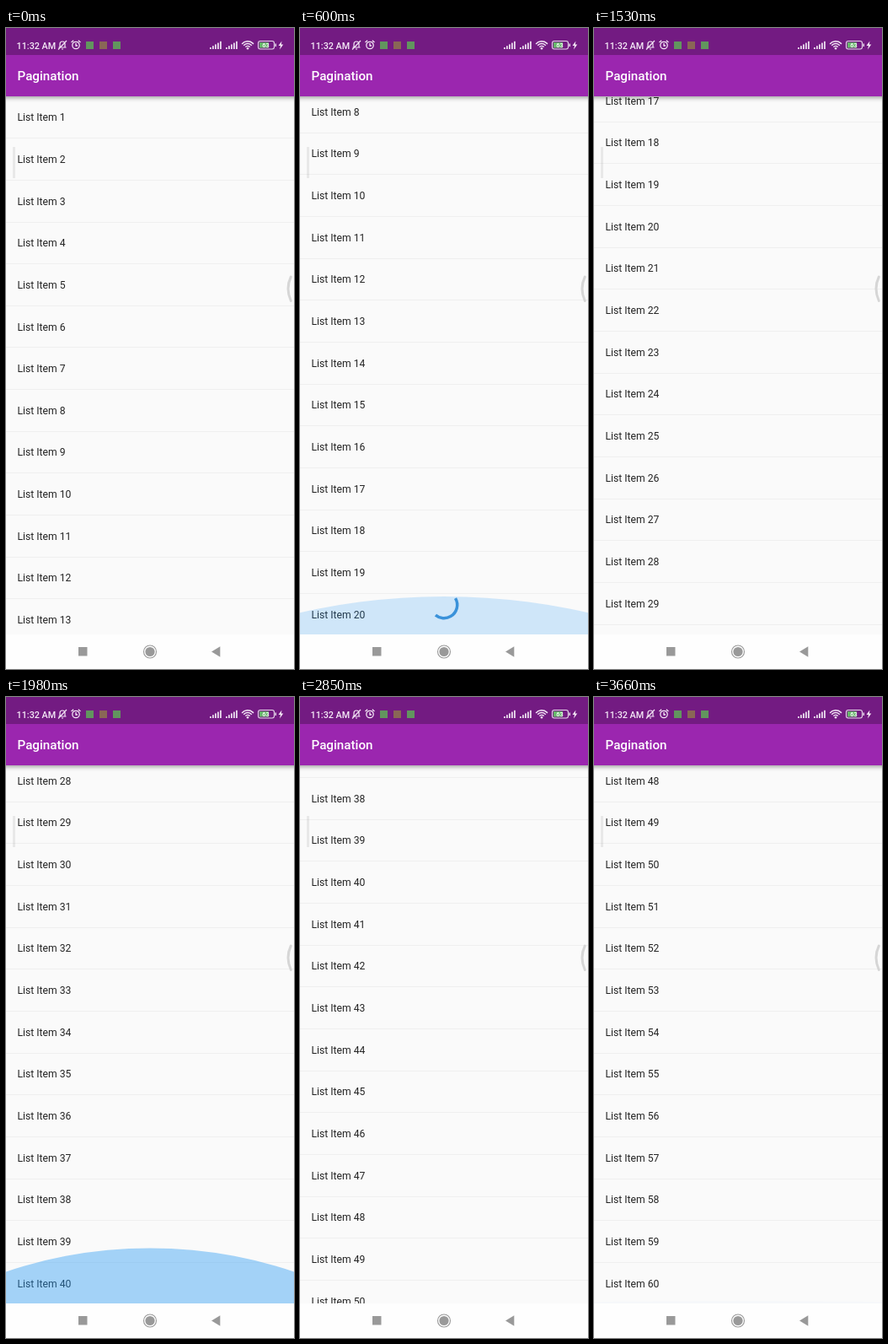
Recreate the animation shown at these times as an HTML page with a canvas. Size 342x760 px, loop 3690 ms.

```html
<!DOCTYPE html>
<html lang="en">
<head>
<meta charset="utf-8">
<title>Pagination</title>
<style>
  html, body { margin: 0; width: 342px; height: 760px; overflow: hidden; background: #fafafa; }
  canvas { display: block; }
</style>
</head>
<body>
<canvas id="stage" width="342" height="760"></canvas>
<script>
const ctx = document.getElementById('stage').getContext('2d');
const W = 342, H = 760, LOOP = 3690, STEP = 30;
const LIST_TOP = 81, LIST_BOTTOM = 719;
const ROW = 49.66, FIRST_ROW = 106, PAGE = 20;
const TAU = Math.PI * 2;

// Each swipe runs until the end of the loaded list; power shapes its acceleration.
const swipes = [
  { start: 30, end: 250, distance: 354.2, power: 1.6 },
  { start: 1290, end: 1760, distance: PAGE * ROW, power: 1.146 },
  { start: 2640, end: 2990, distance: PAGE * ROW, power: 1.442 }
];
const glows = [
  { start: 235, rise: 250, opacity: 0.3 },
  { start: 1760, rise: 280, opacity: 0.42 },
  { start: 2990, rise: 200, opacity: 0.36 }
];
const loads = [340, 2052, 3080];
const LOAD_TIME = 510, RECEDE = 600;

const clamp01 = v => Math.min(1, Math.max(0, v));

function scrollAt(t) {
  return swipes.reduce((sum, s) =>
    sum + s.distance * clamp01((t - s.start) / (s.end - s.start)) ** s.power, 0);
}

// Cubic bezier (0.4, 0, 0.2, 1)
function fastOutSlowIn(x) {
  let lo = 0, hi = 1;
  for (let i = 0; i < 24; i++) {
    const s = (lo + hi) / 2, r = 1 - s;
    if (1.2 * r * r * s + 0.6 * r * s * s + s ** 3 < x) lo = s; else hi = s;
  }
  return lo * lo * (3 - 2 * lo);
}

function rect(x, y, w, h, color) {
  ctx.fillStyle = color;
  ctx.fillRect(x, y, w, h);
}

function text(str, x, y, font, color, align = 'left') {
  ctx.font = font + ' Roboto, sans-serif';
  ctx.fillStyle = color;
  ctx.textAlign = align;
  ctx.fillText(str, x, y);
}

function poly(points, color) {
  ctx.beginPath();
  points.forEach(([x, y]) => ctx.lineTo(x, y));
  ctx.closePath();
  ctx.fillStyle = color;
  ctx.fill();
}

function stroke(color, width, trace) {
  ctx.beginPath();
  trace();
  ctx.strokeStyle = color;
  ctx.lineWidth = width;
  ctx.stroke();
}

function disc(x, y, r, color) {
  ctx.beginPath();
  ctx.arc(x, y, r, 0, TAU);
  ctx.fillStyle = color;
  ctx.fill();
}

function drawList(scroll) {
  const first = Math.max(0, Math.floor((scroll - 60) / ROW));
  for (let i = first; i < first + 16; i++) {
    const y = FIRST_ROW + i * ROW - scroll;
    text('List Item ' + (i + 1), 13.5, y + 4.2, '12.18px', '#242424');
    rect(0, Math.round(y + 24.2), W, 1, '#efefef');
  }
}

function drawGlow(t, { start, rise, opacity }) {
  const age = t - start;
  if (age <= 0 || age >= rise + RECEDE) return;
  const level = age < rise
    ? 1 - (1 - age / rise) ** 2
    : (1 - (age - rise) / RECEDE) ** 2;
  const radius = W * 1.5, height = W * 0.2009;
  ctx.save();
  ctx.translate(0, LIST_BOTTOM);
  ctx.scale(1, level);
  disc(W / 2, radius - height, radius, `rgba(33,150,243,${opacity * level})`);
  ctx.restore();
}

function drawSpinner(age) {
  if (age < 0 || age >= LOAD_TIME) return;
  const phase = age / 1333;
  const head = fastOutSlowIn(clamp01(phase * 2)) * 0.75 * TAU;
  const start = (-0.25 + age / 2222 + phase * 0.25) * TAU;
  stroke('#3a92da', 3.5, () => ctx.arc(171, 684, 15.7, start, start + head));
}

function drawHandles() {
  rect(8, 141, 3, 37, 'rgba(0,0,0,0.07)');
  ctx.lineCap = 'round';
  stroke('#d6d6d6', 3, () => {
    ctx.moveTo(338.3, 295);
    ctx.quadraticCurveTo(331.7, 309, 338.3, 323.5);
  });
  ctx.lineCap = 'butt';
}

function drawBell(x, y) {
  stroke('#f3e6f5', 1.2, () => {
    ctx.moveTo(x - 4.5, y + 3);
    ctx.lineTo(x + 4.5, y + 3);
    ctx.moveTo(x - 3, y + 3);
    ctx.lineTo(x - 3, y - 1);
    ctx.arc(x, y - 1, 3, Math.PI, 0);
    ctx.lineTo(x + 3, y + 3);
    ctx.moveTo(x - 1, y + 5);
    ctx.lineTo(x + 1, y + 5);
    ctx.moveTo(x + 5, y - 5);
    ctx.lineTo(x - 5, y + 5.5);
  });
}

function drawAlarm(x, y) {
  stroke('#f3e6f5', 1.3, () => {
    ctx.arc(x, y + 0.5, 4.2, 0, TAU);
    ctx.moveTo(x, y - 2);
    ctx.lineTo(x, y + 1);
    ctx.lineTo(x + 2, y + 1);
    ctx.moveTo(x - 5.5, y - 3);
    ctx.lineTo(x - 2.8, y - 5.3);
    ctx.moveTo(x + 5.5, y - 3);
    ctx.lineTo(x + 2.8, y - 5.3);
  });
}

function drawSignal(x) {
  for (let i = 0; i < 5; i++) {
    const h = 2 + i * 1.8;
    rect(x + i * 3, 25 - h, 1.8, h, '#eadcee');
  }
}

function drawWifi(x, y) {
  [3.6, 6.4, 9.2].forEach(r =>
    stroke('#f3e6f5', 1.5, () => ctx.arc(x, y, r, -0.77 * Math.PI, -0.23 * Math.PI)));
  disc(x, y - 0.8, 1.3, '#f3e6f5');
}

function drawBattery() {
  stroke('#e6d8ea', 1.1, () => ctx.roundRect(299.5, 15.5, 19, 9.5, 2.5));
  rect(301, 17, 11, 6.5, '#67b56b');
  rect(319.5, 18.5, 1.5, 3.5, '#e6d8ea');
  text('63', 308.5, 23.2, '500 7.5px', '#ffffff', 'center');
  poly([[327.5, 15.5], [323.5, 21], [326, 21], [325, 25.5], [329.3, 19.5], [326.8, 19.5]], '#f3e6f5');
}

function drawHeader() {
  ctx.save();
  ctx.shadowColor = 'rgba(0,0,0,0.36)';
  ctx.shadowBlur = 5;
  ctx.shadowOffsetY = 2;
  rect(-10, 0, W + 20, LIST_TOP, '#9b26af');
  ctx.restore();
  rect(0, 0, W, 32, '#731b82');
  text('Pagination', 13.5, 62.3, '500 15.2px', '#ffffff');
  text('11:32 AM', 12.5, 24.5, '500 10.8px', '#f5eaf7');
  drawBell(67, 20);
  drawAlarm(83, 20);
  rect(95, 16, 9, 9, '#62955e');
  rect(111, 16, 9, 9, '#8a6756');
  rect(127, 16, 9, 9, '#62955e');
  drawSignal(242);
  drawSignal(261);
  drawWifi(287, 25);
  drawBattery();
}

function drawNavigation() {
  const gray = '#999999';
  rect(0, LIST_BOTTOM, W, H - LIST_BOTTOM, '#fefefe');
  rect(86, 734, 10.5, 10.5, gray);
  disc(171, 739.5, 5.6, gray);
  stroke(gray, 1.1, () => ctx.arc(171, 739.5, 7.5, 0, TAU));
  poly([[244, 739.5], [254.3, 733.3], [254.3, 745.7]], gray);
}

function draw(t) {
  rect(0, 0, W, H, '#fafafa');
  drawList(scrollAt(t));
  glows.forEach(glow => drawGlow(t, glow));
  loads.forEach(start => drawSpinner(t - start));
  drawNavigation();
  drawHeader();
  drawHandles();
}

function tick() {
  const t = performance.now() % LOOP;
  draw(Math.floor(t / STEP) * STEP);
  requestAnimationFrame(tick);
}
tick();
</script>
</body>
</html>
```
